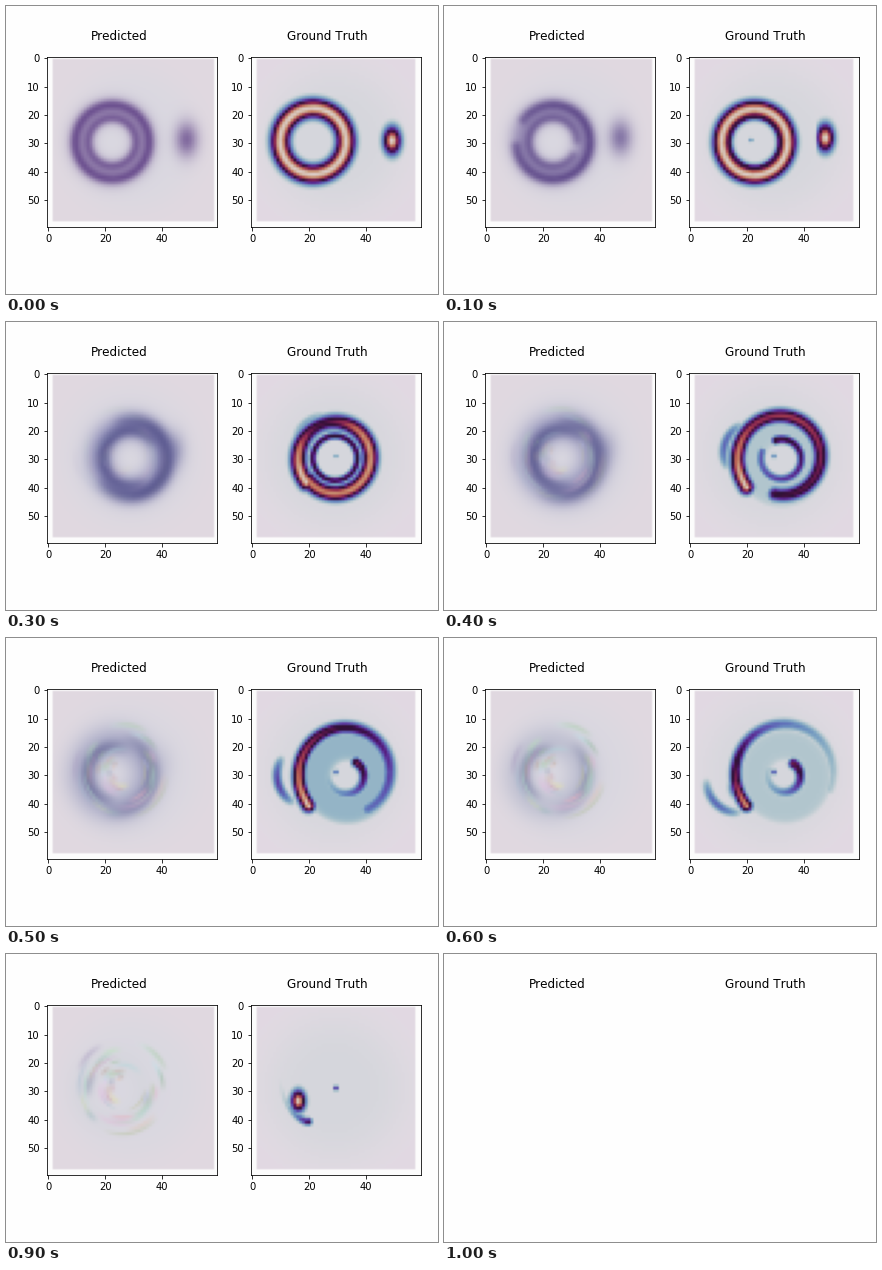
Recreate the animation shown at these times as a matplotlib script. Size 432 by 288 pixels, loop 1.16 s.

```python
import colorsys
import random

import matplotlib.pyplot as plt
import numpy as np
from matplotlib.animation import FuncAnimation

W, H, DPI = 432, 288, 72
N = 60
TICK, FRAMES, STEPS = 20, 58, 10
Y, X = np.mgrid[0:N, 0:N].astype(float)
T = np.linspace(0, 1, 90)


def ease(u):
    u = min(max(u, 0), 1)
    return u * u * (3 - 2 * u)


def hump(s, peak, width):
    return np.exp(-((s - peak) / width)**2)


def mix(a, b, t):
    t = min(max(t, 0), 1)
    return np.asarray(a) * (1 - t) + np.asarray(b) * t


def spot(cx, cy, sx, sy, amp):
    return amp * np.exp(-((X - cx) / sx)**2 - ((Y - cy) / sy)**2)


def arc(cx, cy, r, start, span, w, amp):
    """Soft stroke along an arc; r and amp may vary with T."""
    a = np.radians(start + span * T)
    d2 = (X[..., None] - cx - r * np.cos(a))**2 + (Y[..., None] - cy - r * np.sin(a))**2
    return (amp * np.exp(-d2 / w**2)).max(axis=-1)


def frame_edge(img, right):
    inside = (X >= 2) & (X < right) & (Y >= 1) & (Y < 58)
    return np.where(inside[..., None], img, .99)


def truth(s):
    """A drifting ring opens into a spiral and shrinks to a bright core."""
    cx, cy = 21.4 + 12 * ease(s / 5), 29.3 + .7 * hump(s, 2, 1.5)

    head = 11.6 + 6.2 * ease((s - 2) / 3)
    rim = 11.6 + .024 * s**3
    radius = head + (rim - head) * T**.7
    fade = np.exp(-.14 * max(s - 2, 0)**2 * T)
    gap = 1 - .38 * hump(s, 3, 1) * np.exp(-((T - .3) / .14)**2)
    gain = .95 * (1 - .5 * ease((s - 5) / 4))
    arm = arc(cx, cy, radius, 140, 360 - 40 * max(s - 3, 0), 3.1 - .2 * s,
              gain * fade * gap)

    opened = ease((s - 3) / 2)
    hook_amp = mix(.5 + 0 * T, .1 + .54 * T**1.5, opened)
    hook = arc(cx, cy + opened, 9.5 - .55 * s - opened * T, 200, -360 + 105 * opened,
               1.2 + .4 * opened, hook_amp * (1 - ease((s - 6) / 3)))

    tail = arc(20 - 3 * (s - 5), 30 + 2 * (s - 5), 11.3, 212 - 32 * (s - 5), -92,
               1.6, .34 * hump(s, 5, 2.2) * np.sin(np.pi * T)**.5)

    drop = spot(49.3 - 1.7 * s, 29.2 - s, 2.8, 4.4, .97)
    drop /= 1 + np.exp(-(X - 38 - 6.3 * s) / .3)

    core = spot(16.2, 34.5 - .25 * (s - 5), 2.3, 3.4, .95 * ease((s - 5) / 2))
    r = np.hypot(X - cx, Y - 30.5)
    haze = .125 * hump(s, 5, 1.6) * np.exp(-((r - 11) / 6)**6)
    dots = [spot(29.5, 29, .9, .9, .06 * min(s, 7)),
            spot(21.4, 29, .9, .9, .2 * hump(s, 1, .5))]
    base = .035 * np.exp(-(np.hypot(X - 29, Y - 29) / 27)**4)

    v = np.max([base, haze, core, drop, arm, hook, tail, *dots], axis=0)
    return frame_edge(plt.get_cmap("twilight")(v)[..., :3], 58)


PURPLE, SLATE, PALE = (.50, .41, .62), (.47, .47, .68), (.76, .80, .81)
DARK, NAVY, TEAL = (.34, .21, .50), (.30, .29, .52), (.50, .56, .66)

rng = random.Random(7)
streaks = [(rng.uniform(3, 17), rng.uniform(0, 360), rng.uniform(20, 75),
            rng.uniform(.5, 1.1),
            colorsys.hsv_to_rgb(rng.random(), .2, rng.uniform(.7, .95)))
           for _ in range(45)]


def paint(img, mask, rgb):
    return img + (np.asarray(rgb) - img) * mask[..., None]


def sweep(cx, cy, r, mid, half, w, alpha):
    """Arc about the angle mid, tapering more as it gets shorter."""
    taper = (180 - half) / 180
    amp = alpha * np.abs(np.sin(np.pi * T))**taper
    return arc(cx, cy, r, mid - half, 2 * half, w, amp)


def predicted(s):
    """A blurred ring that splits into two dark sides and dissolves."""
    cx, cy = 22.4 + 6.6 * hump(s, 3, 1.5), 29.7
    late = ease((s - 3) / 6)
    soft = mix(mix(PURPLE, SLATE, s / 3), PALE, late)
    deep = mix(mix(DARK, NAVY, s / 3), TEAL, late)

    img = np.ones((N, N, 3)) * (.88, .85, .88)
    img = paint(img, np.exp(-(np.hypot(X - 29, Y - 29) / 25)**6), (.855, .847, .88))
    body = sweep(cx, cy, 11, 0, 180, 4.3 + 2 * hump(s, 5, 2), .7 - .55 * late)
    img = paint(img, body, soft)
    inner = sweep(cx, cy, 8.4 + 1.6 * hump(s, 4, 2), 195, 180 - 17 * s,
                  1.7 + .9 * hump(s, 4, 2), .6 + .15 * hump(s, 4, 2) - .2 * late)
    outer = sweep(cx, cy, 13, 15, 180 - 19 * s,
                  1.8 + 1.2 * hump(s, 4, 2), .65 + .2 * hump(s, 2, 2) - .4 * late)
    img = paint(paint(img, inner, deep), outer, deep)
    drop = spot(48.8 - 1.5 * s, 28.8 - .7 * s, 4, 6, .8 * (1 - ease(s / 6)))
    img = paint(img, drop, mix(soft, deep, .5))

    alpha = .4 * ease((s - 2) / 4)
    for r, a, span, w, rgb in streaks:
        img = paint(img, sweep(26, 29, r, a + 9 * s, span / 2, w, alpha), rgb)
    return frame_edge(img, 59)


plt.rcParams["font.family"] = "DejaVu Sans"
plt.rcParams["text.kerning_factor"] = 6
fig = plt.figure(figsize=(W / DPI, H / DPI), dpi=DPI, facecolor="#fefefe")


def panel(left, title, title_x, img):
    ax = fig.add_axes([left / W, 67 / H, 170 / W, 170 / H])
    im = ax.imshow(img)
    ax.set_xticks([0, 20, 40])
    ax.set_yticks(range(0, 51, 10))
    ax.tick_params(labelsize=10)
    fig.text(title_x / W, (H - 34) / H, title, fontsize=12)
    return ax, im


shots = [(predicted(s), truth(s)) for s in range(STEPS)]
panels = [panel(41, "Predicted", 84.6, shots[0][0]),
          panel(245, "Ground Truth", 281.4, shots[0][1])]


def update(i):
    step = i * TICK // 100
    for k, (ax, im) in enumerate(panels):
        ax.set_visible(step < STEPS)
        if step < STEPS:
            im.set_data(shots[step][k])
    return []


anim = FuncAnimation(fig, update, frames=FRAMES, interval=TICK,
                     repeat=True, repeat_delay=0, blit=False)
plt.show()
```
